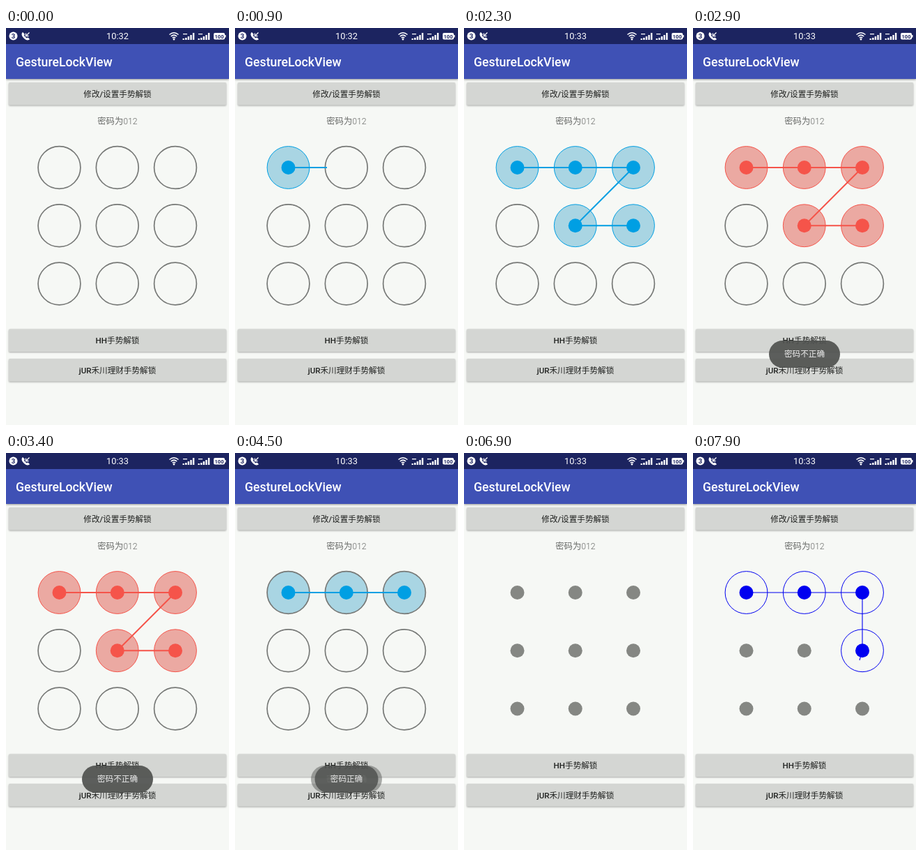
Write an HTML page that moves like this. It is 320 px wide and 569 px high and loops after 8000 ms.

```html
<!DOCTYPE html>
<html lang="zh-CN">
<head>
<meta charset="utf-8">
<style>
html, body { margin: 0; width: 100%; height: 100%; overflow: hidden; background: #f6f8f5; }
svg { display: block; width: 320px; height: 569px; }
text { font-family: Roboto, "Noto Sans CJK SC", "Noto Sans CJK", sans-serif; text-anchor: middle; }
.btn rect { fill: #d4d6d3; filter: drop-shadow(0 1px 1px rgba(0,0,0,.32)); }
.btn text { font-size: 11.6px; font-weight: 500; fill: #202220; }
.toast rect { fill: #505250; fill-opacity: .92; }
.toast text { font-size: 11.6px; fill: #eee; }
</style>
</head>
<body>
<svg viewBox="0 0 320 569">
  <rect width="320" height="569" fill="#f6f8f5"/>
  <rect y="23" width="320" height="50" fill="#3f51b5" style="filter:drop-shadow(0 1px 1.5px rgba(0,0,0,.4))"/>
  <rect width="320" height="23" fill="#1c2460"/>
  <text x="14" y="55" style="text-anchor:start;font-size:17.7px;font-weight:500" fill="#fff">GestureLockView</text>

  <!-- status bar -->
  <g fill="#fff">
    <circle cx="10.5" cy="11.5" r="6"/>
    <text x="10.5" y="15" font-size="9.5" font-weight="700" fill="#1c2460">3</text>
    <path d="M24 6C21.500 8 22.500 11.500 25.500 14.500S32 18.500 34 16L31.500 13.500 29.500 14.500 26 11 26.800 8.800Z"/>
    <path d="M33.500 6.500L29 11M28.500 7.500V11.500H32.500" fill="none" stroke="#fff" stroke-width="1.300"/>
    <text id="clock" x="160" y="16" font-size="12.8"></text>
    <g fill="none" stroke="#fff" stroke-width="1.500">
      <path d="M234.500 9.500Q241 4 247.500 9.500M236.700 12Q241 8.300 245.300 12M238.800 14.300Q241 12.400 243.200 14.300"/>
    </g>
    <circle cx="241" cy="16.200" r="1.300"/>
    <g id="signal"></g>
    <use href="#signal" x="22"/>
    <rect x="298" y="7" width="16" height="9.500" rx="2"/>
    <rect x="314" y="10" width="1.500" height="3.500"/>
    <text x="306" y="14.500" font-size="7.500" font-weight="700" fill="#1c2460">100</text>
  </g>

  <text x="160" y="137.500" font-size="12.3" font-weight="300" fill="#686a68">密码为012</text>
  <g id="marks"></g>
  <rect id="lift" x="4" y="476" width="312" height="34" rx="2" fill="#000" style="filter:blur(2.5px)"/>
  <g id="buttons"></g>
  <g id="wrong" class="toast"><rect x="109" y="448" width="102" height="39" rx="19.5"/><text x="160" y="470.5">密码不正确</text></g>
  <g id="right" class="toast"><rect x="114.500" y="448" width="91" height="39" rx="19.5"/><text x="160" y="470.5">密码正确</text></g>
</svg>
<script>
const $ = id => document.getElementById(id);
const LOOP = 8000, STEP = 100;

$('signal').innerHTML = [2, 3, 5, 7, 10].map((h, i) =>
  `<rect x="${253.5 + i * 3.6}" y="${17 - h}" width="2.4" height="${h}"/>`).join('') +
  '<path d="M254 8h6v1.300h-6z"/>';

$('buttons').innerHTML = [[78, '修改/设置手势解锁'], [431.5, 'HH手势解锁'], [474, 'jUR禾川理财手势解锁']]
  .map(([y, label]) => `<g class="btn"><rect x="4" y="${y}" width="312" height="32.5" rx="1.5"/>
    <text x="160" y="${y + 20.5}">${label}</text></g>`).join('');

const center = n => [76.5 + n % 3 * 83.25, 200 + Math.floor(n / 3) * 83.25];

const blue = { fill: '#a9d5e3', ring: '#009fe3', dot: '#009fe3', ringWidth: 1, line: 2 };
const done = { ...blue, ring: '#777977', ringWidth: 1.7 };
const red = { fill: '#eba9a2', ring: '#f5544a', dot: '#f5544a', ringWidth: 1, line: 2 };
const plain = { fill: 'none', ring: '#0000f0', dot: '#0000f0', ringWidth: 1, line: 1.1 };

// Path points are [time, node] or [time, x, y] for a free finger position.
const gestures = [
  { path: [[700, 0], [1000, 1], [1250, 2], [1600, 4], [1800, 199, 309], [2150, 5]],
    up: 2450, clear: 3500, drag: blue, end: red },
  { path: [[3750, 0], [4020, 1], [4260, 2]],
    up: 4400, clear: 5300, drag: blue, end: done },
  { path: [[7050, 0], [7200, 80, 200], [7450, 1], [7650, 2], [7850, 5], [7900, 239, 297]],
    up: LOOP, clear: LOOP, drag: plain, end: plain }
];

const ramp = (t, a, b) => Math.max(0, Math.min(1, (t - a) / (b - a)));
const place = p => p.length > 2 ? p.slice(1) : center(p[1]);
const circle = ([x, y], r, fill, stroke = 'none', w = 0) =>
  `<circle cx="${x}" cy="${y}" r="${r}" fill="${fill}" stroke="${stroke}" stroke-width="${w}"/>`;

function finger(path, t) {
  const i = path.findIndex(p => p[0] > t);
  if (i < 0) return place(path[path.length - 1]);
  const a = place(path[i - 1]), b = place(path[i]);
  const k = ramp(t, path[i - 1][0], path[i][0]);
  return a.map((v, j) => v + (b[j] - v) * k);
}

function marks(t) {
  const g = gestures.find(g => t >= g.path[0][0] && t < g.clear);
  const nodes = g ? g.path.filter(p => p.length < 3 && p[0] <= t).map(p => p[1]) : [];
  const look = g && (t < g.up ? g.drag : g.end);
  let rings = '', dots = '', line = '';
  for (let n = 0; n < 9; n++) {
    const c = center(n);
    if (nodes.includes(n)) {
      rings += circle(c, 30.4, look.fill, look.ring, look.ringWidth);
      dots += circle(c, 10, look.dot);
    } else if (t < 5900) rings += circle(c, 30.4, 'none', '#777977', 1.7);
    else dots += circle(c, 10, '#858783');
  }
  if (g) {
    const pts = nodes.map(center);
    if (t < g.up) pts.push(finger(g.path, t));
    line = `<polyline points="${pts.join(' ')}" fill="none" stroke="${look.dot}" stroke-width="${look.line}"/>`;
  }
  return rings + line + dots;
}

function frame(now) {
  const t = Math.floor(now % LOOP / STEP) * STEP;
  $('clock').textContent = t < 2300 ? '10:32' : '10:33';
  $('marks').innerHTML = marks(t);
  $('lift').style.opacity = .36 * ramp(t, 5600, 5800) * (1 - ramp(t, 6000, 6300));
  $('wrong').style.opacity = ramp(t, 2500, 2750) * (1 - ramp(t, 4400, 4600));
  $('right').style.opacity = ramp(t, 4390, 4510) * (1 - ramp(t, 6400, 6750));
}

const start = performance.now();
(function tick() {
  frame(performance.now() - start);
  requestAnimationFrame(tick);
})();
</script>
</body>
</html>
```
